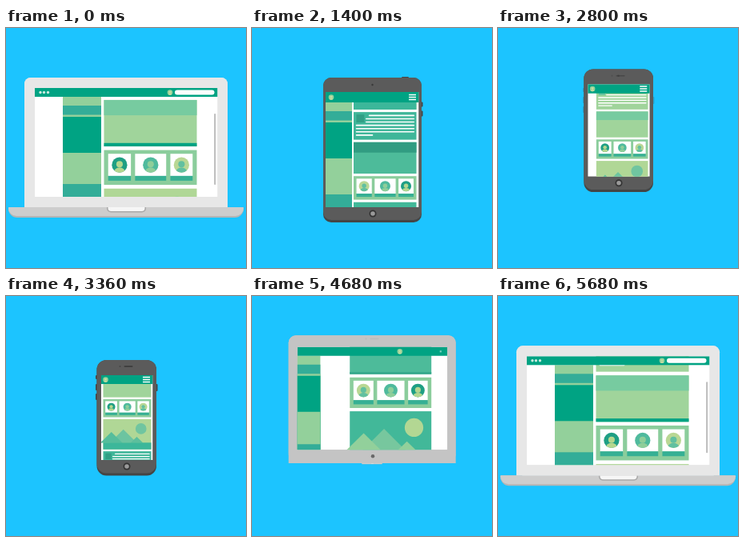
Animation, 300 px wide and 300 px high, one loop 5.72 s. Source, as an HTML page with a canvas:

```html
<!DOCTYPE html>
<html lang="en">
<head>
<meta charset="utf-8">
<title>Responsive devices</title>
<style>
html, body { margin: 0; width: 100%; height: 100%; overflow: hidden; background: #1cc4ff; }
canvas { display: block; width: 300px; height: 300px; }
</style>
</head>
<body>
<canvas id="stage"></canvas>
<script>
const canvas = document.getElementById('stage');
const ratio = window.devicePixelRatio || 1;
canvas.width = canvas.height = 300 * ratio;
const ctx = canvas.getContext('2d');

const LOOP = 5720, STEP = 40;
const GREEN = '#00a383', LIGHT = '#93d09b', TEAL = '#33ad98';

// Vertical values are offsets from the centre of the device.
const laptop = {
  left: 23, right: 277, top: -81, bottom: 81, radius: 8, tone: 231,
  sl: 36, sr: 264.5, st: -68, sb: 68, nav: 11,
  side: 71, sideEnd: 119, sideLow: 109, main: 122.5, mainEnd: 238.5,
  avatar: 205, menu: 256, home: 76, cam: -78, dark: 0, lap: 1, tab: 0, phone: 0
};
const tablet = {
  left: 89, right: 212, top: -90.5, bottom: 90.5, radius: 10, tone: 91,
  sl: 92, sr: 208.5, st: -72.5, sb: 71.5, nav: 13,
  side: 92, sideEnd: 125, sideLow: 115, main: 127, mainEnd: 205.5,
  avatar: 99, menu: 200.5, home: 79.5, cam: -81.5, dark: 1, lap: 0, tab: 1, phone: 0
};
const phone = {
  left: 113.5, right: 188, top: -72, bottom: 72.5, radius: 12, tone: 91,
  sl: 119, sr: 183.5, st: -53, sb: 53, nav: 11,
  side: -55, sideEnd: -15, sideLow: 115, main: 121.5, mainEnd: 181.5,
  avatar: 124.5, menu: 175.5, home: 61, cam: -64, dark: 1, lap: 0, tab: 0, phone: 1
};
const morphs = [
  [541, 1227, laptop, tablet],
  [2360, 3020, tablet, phone],
  [4223, 4909, phone, laptop]
];

// Centre height of the device over time.
const hop = [[0, 143], [300, 137], [420, 131], [560, 126], [700, 126], [840, 129],
  [1200, 135.5], [1400, 152.5], [1540, 155], [1800, 151.5], [2320, 141.5],
  [2400, 137], [2520, 132], [2760, 128], [3000, 131], [3360, 152], [3460, 153.5],
  [3600, 151.5], [4200, 148], [4440, 136], [4680, 128], [4800, 125], [4860, 125],
  [5120, 145], [5260, 148], [5400, 147], [5680, 143.3], [5720, 143]];

// Page scroll, measured in column widths.
const GROUP = 2.105;
const scroll = [[0, 0.446], [560, 1.54], [840, 1.825], [1200, 1.91], [1400, 1.951],
  [2320, 4.16], [2480, 4.3], [3000, 4.37], [3360, 4.913], [4250, 6.85],
  [4680, 7.07], [4900, 7.2], [5680, 8.788], [5720, 0.446 + 4 * GROUP]];

const lerp = (a, b, p) => a + (b - a) * p;
const clamp = v => Math.max(0, Math.min(1, v));
const ease = v => 0.5 - 0.5 * Math.cos(Math.PI * clamp(v));

// Smooth curve through the points that never overshoots them.
function track(points, t) {
  const last = points.length - 1;
  let i = 0;
  while (i < last - 1 && t >= points[i + 1][0]) i++;
  const slope = k => (points[k + 1][1] - points[k][1]) / (points[k + 1][0] - points[k][0]);
  const tangent = k => {
    const a = slope(k > 0 ? k - 1 : last - 1), b = slope(k < last ? k : 0);
    return a * b <= 0 ? 0 : 2 * a * b / (a + b);
  };
  const [t0, v0] = points[i], [t1, v1] = points[i + 1];
  const d = t1 - t0, u = (t - t0) / d, w = 1 - u;
  return v0 * (1 + 2 * u) * w * w + d * tangent(i) * u * w * w
    + v1 * u * u * (3 - 2 * u) - d * tangent(i + 1) * u * u * w;
}

function poseAt(t) {
  let pose = laptop;
  for (const [start, end, a, b] of morphs) {
    if (t < start) break;
    const p = ease((t - start) / (end - start));
    pose = {};
    for (const key in a) pose[key] = lerp(a[key], b[key], p);
  }
  return pose;
}

function box(x, y, w, h, color) {
  ctx.fillStyle = color;
  ctx.fillRect(x, y, w, h);
}
function round(x, y, w, h, r, color) {
  if (w <= 0 || h <= 0) return;
  ctx.fillStyle = color;
  ctx.beginPath();
  ctx.roundRect(x, y, w, h, r);
  ctx.fill();
}
function oval(x, y, rx, ry, color) {
  ctx.fillStyle = color;
  ctx.beginPath();
  ctx.ellipse(x, y, Math.max(0, rx), Math.max(0, ry), 0, 0, 7);
  ctx.fill();
}
const dot = (x, y, r, color) => oval(x, y, r, r, color);
const grey = v => `rgb(${v},${v},${v})`;

function person(x, y, r, back, color) {
  dot(x, y, r, back);
  ctx.save();
  ctx.beginPath();
  ctx.arc(x, y, r, 0, 7);
  ctx.clip();
  dot(x, y - r * 0.08, r * 0.42, color);
  oval(x, y + r * 0.85, r * 0.7, r * 0.5, color);
  ctx.restore();
}

// Page blocks are drawn in a space where the column is one unit wide.
function textBlock(alt) {
  box(0, 0, 1, 0.44, alt ? '#3fb699' : '#a0d49b');
  box(0.045, 0.04, 0.125, 0.125, alt ? '#319f85' : '#6dc5a0');
  const starts = [0.24, 0.19, 0.19, 0.035, 0.035, 0.035, 0.035];
  starts.forEach((x, i) => {
    round(x, 0.045 + i * 0.052, (i < 6 ? 0.97 : 0.31) - x, 0.02, 0.01, '#fff');
  });
}
function headerBlock(alt, lap) {
  box(0, 0, 1, 0.5, alt ? '#4dbb9a' : '#a0d49b');
  box(0, 0, 1, 0.165, alt ? '#319c82' : '#77cba0');
  box(0, 0.5 - 0.036 * lap, 1, 0.036 * lap, alt ? '#36a88c' : GREEN);
}
function cardsBlock(alt) {
  box(0, 0, 1, 0.375, '#8bcd9c');
  const skins = [['#1f9f84', '#b5d78f'], ['#4fba9d', '#8fce9a'], ['#b9d794', '#62c0a0']];
  if (alt) skins.reverse();
  [[0.045, 0.245], [0.335, 0.335], [0.715, 0.24]].forEach(([x, w], i) => {
    box(x, 0.04, w, 0.24, '#fff');
    box(x, 0.278, w, 0.052, '#36b094');
    person(x + w / 2, 0.16, 0.083, ...skins[i]);
  });
}
function hill(x, y, half, color) {
  ctx.fillStyle = color;
  ctx.beginPath();
  ctx.moveTo(x, y);
  ctx.lineTo(x + half, 0.495);
  ctx.lineTo(x - half, 0.495);
  ctx.fill();
}
function sceneBlock(alt) {
  box(0, 0, 1, 0.63, alt ? '#42b899' : '#b0d796');
  dot(0.787, 0.2, 0.114, alt ? '#b3d793' : '#70c5a0');
  hill(0.42, 0.215, 0.28, alt ? '#77c79e' : '#6cc4a0');
  hill(0.17, 0.27, 0.23, alt ? '#92d09b' : '#55bd9c');
  hill(0.70, 0.37, 0.13, alt ? '#92d09b' : '#5cbf9d');
  box(0, 0.49, 1, 0.14, alt ? '#a0d49b' : '#3cb79a');
}
const blocks = [[0, textBlock], [0.48, headerBlock], [1.02, cardsBlock], [1.435, sceneBlock]];

function page(d, top, bottom, pos) {
  const w = d.mainEnd - d.main;
  const first = Math.floor(pos / GROUP);
  for (let g = first; g < first + 3; g++) {
    for (const [at, draw] of blocks) {
      const y = top + (g * GROUP + at - pos) * w;
      if (y > bottom || y + 0.7 * w < top) continue;
      ctx.save();
      ctx.translate(d.main, y);
      ctx.scale(w, w);
      draw(g % 2 === 1, d.lap);
      ctx.restore();
    }
  }
}

function sidebar(d, top, bottom) {
  const w = d.sideEnd - d.side;
  const rows = [[0, LIGHT], [11, TEAL], [22.5, LIGHT], [25, GREEN], [70, LIGHT], [d.sideLow, TEAL]];
  rows.forEach(([y, color]) => box(d.side, top + y, w, Math.max(0, bottom - top - y), color));
}

function navbar(d, y, k) {
  box(d.sl, y, d.sr - d.sl, d.nav, GREEN);
  const mid = y + d.nav / 2;
  person(d.avatar, mid, 3.3, LIGHT, '#c9dda0');
  [43, 47.5, 52.5].forEach(x => dot(x, mid, 1.7 * k, '#c9eadf'));
  round(260.5 - 49.5 * k, mid - 3 * k, 49.5 * k, 6 * k, 3 * k, '#fff');
  const s = 1 - d.lap;
  if (s > 0.01) [-3, 0, 3].forEach(o => box(d.menu - 4.5 * s, mid + (o - 0.75) * s, 9 * s, 1.5 * s, '#fff'));
}

function laptopBase(c, k) {
  if (k <= 0) return;
  const w = 294 * k, x = 150 - w / 2, y = c + 81;
  round(x, y, w, 13 * k, [1, 1, 11 * k, 11 * k], '#b5b5b5');
  round(x, y, w, 11 * k, [1, 1, 10 * k, 10 * k], '#cdcdcd');
  round(150.5 - 24.5 * k, y, 49 * k, 6.5 * k, [0, 0, 5 * k, 5 * k], '#a9a9a9');
  round(150.5 - 23 * k, y, 46 * k, 5 * k, [0, 0, 4 * k, 4 * k], '#f6f6f6');
}

function buttons(d, c) {
  ctx.globalAlpha = clamp(d.tab * 3 - 2);
  round(d.right - 1, c - 60, 2.5, 6, 1, '#444');
  round(d.right - 1, c - 49, 2.5, 7, 1, '#444');
  round(d.right - 25, c + d.top - 1, 9, 3, 1, '#444');
  ctx.globalAlpha = clamp(d.phone * 3 - 2);
  [[-53, 5], [-42, 8], [-30, 8]].forEach(([y, h]) => round(d.left - 1.5, c + y, 3, h, 1, '#444'));
  round(d.right - 1, c - 42, 2.5, 9, 1, '#444');
  ctx.globalAlpha = 1;
}

function details(d, c, opening) {
  const cam = c + d.cam;
  ctx.globalAlpha = clamp(d.tab * 2.5);
  dot(150.5, cam, 1.2, '#393939');
  ctx.globalAlpha = d.phone ** 2;
  dot(142.5, cam, 1, '#454545');
  round(147.5, cam - 0.8, 11, 1.6, 0.8, '#393939');
  ctx.globalAlpha = 1;

  const y = c + d.home;
  if (opening && d.dark < 0.65) {
    oval(151, y, 4, 5.5 * d.dark ** 2, '#eee');
  } else if (d.dark > 0.01) {
    const r = 4.5 * Math.sqrt(d.dark);
    dot(151, y, r, d.dark < 0.5 ? '#696969' : '#333');
    dot(151, y, r * 0.62, d.dark < 0.5 ? '#696969' : '#9a9a9a');
  }
}

function draw(t) {
  const d = poseAt(t), c = track(hop, t);
  const k = t < 2000 ? 1 - clamp((t - 400) / 190) : ease((t - 4600) / 420);
  ctx.setTransform(ratio, 0, 0, ratio, 0, 0);
  box(0, 0, 300, 300, '#1cc4ff');

  laptopBase(c, k);
  buttons(d, c);
  const w = d.right - d.left, h = d.bottom - d.top, edge = 3 * d.dark;
  round(d.left, c + d.top, w, h, d.radius, grey(d.tone - 22 * d.dark));
  round(d.left, c + d.top, w, h - edge, d.radius, grey(d.tone));
  if (k > 0) box(d.left, c + 70, w, 11, grey(d.tone));
  details(d, c, t < 2000);

  const top = c + d.st, bottom = c + d.sb;
  ctx.save();
  ctx.beginPath();
  ctx.rect(d.sl, top, d.sr - d.sl, bottom - top);
  ctx.clip();
  box(d.sl, top, d.sr - d.sl, bottom - top, '#fff');
  page(d, top + d.nav, bottom, track(scroll, t));
  sidebar(d, top + d.nav, bottom);
  ctx.globalAlpha = k;
  round(260.3, c - 36, 1.7, 89, 0.8, '#b4b4b4');
  ctx.globalAlpha = 1;
  navbar(d, top, k);
  ctx.restore();
}

function tick() {
  const t = performance.now() % LOOP;
  draw(Math.floor(t / STEP) * STEP);
  requestAnimationFrame(tick);
}
tick();
</script>
</body>
</html>
```
